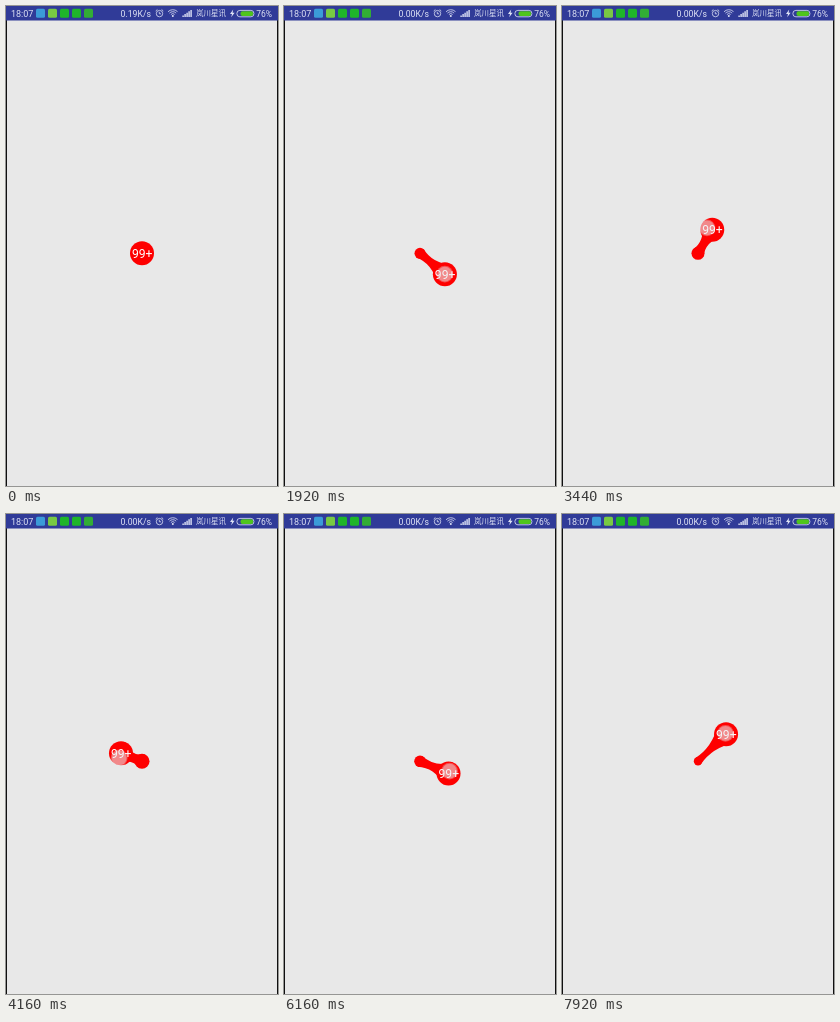
These frames come from a looping animation (272 px wide and 480 px high, 8000 ms). An HTML page with a canvas:

```html
<!DOCTYPE html>
<html lang="zh">
<head>
<meta charset="utf-8">
<title>Sticky badge</title>
<style>
  html, body { margin: 0; width: 100%; height: 100%; overflow: hidden; background: #e8e8e8; }
  canvas { display: block; width: 272px; height: 480px; }
</style>
</head>
<body>
<canvas id="stage" width="272" height="480"></canvas>
<script>
const ctx = document.getElementById('stage').getContext('2d');
const LOOP = 8000, STEP = 80, PRESS = 320, LAG = 85;
const HOME = { x: 136, y: 247.3 }, RADIUS = 12;
const RED = '#fe0000', PALE = '#dfe3f5';

// Drag path around the anchor: time, angle in degrees, distance
const PATH = [
  [320, -40, 0], [880, -40, 25], [1200, -36, 32], [1700, -40, 32.6],
  [2640, -40, 31.2], [3520, 70, 27], [4160, 159, 22.5], [4400, 193, 25],
  [5280, 270, 30], [6160, 337, 31], [7040, 375.7, 33.2], [7920, 404, 39],
  [8000, 405.5, 39.2]
];

function slope(i, k) {
  if (i === 0 || i === PATH.length - 1) return 0;
  const rate = j => (PATH[j + 1][k] - PATH[j][k]) / (PATH[j + 1][0] - PATH[j][0]);
  const a = rate(i - 1), b = rate(i);
  return a * b > 0 ? 2 * a * b / (a + b) : 0;
}

function sample(t, k) {
  const last = PATH.length - 1;
  if (t <= PATH[0][0]) return PATH[0][k];
  if (t >= PATH[last][0]) return PATH[last][k];
  let i = 0;
  while (t > PATH[i + 1][0]) i++;
  const span = PATH[i + 1][0] - PATH[i][0];
  const u = (t - PATH[i][0]) / span, v = 1 - u;
  return PATH[i][k] * (1 + 2 * u) * v * v + slope(i, k) * span * u * v * v
    + PATH[i + 1][k] * u * u * (3 - 2 * u) - slope(i + 1, k) * span * u * u * v;
}

function dragAt(t) {
  const angle = sample(t, 1) * Math.PI / 180, dist = sample(t, 2);
  return { x: HOME.x + dist * Math.cos(angle), y: HOME.y - dist * Math.sin(angle), dist, angle };
}

function disc(x, y, r, fill) {
  ctx.fillStyle = fill;
  ctx.beginPath();
  ctx.arc(x, y, r, 0, Math.PI * 2);
  ctx.fill();
}

function box(x, y, w, h, r, fill) {
  ctx.fillStyle = fill;
  ctx.beginPath();
  ctx.roundRect(x, y, w, h, r);
  ctx.fill();
}

function line(...pts) {
  ctx.beginPath();
  for (let i = 0; i < pts.length; i += 2) ctx.lineTo(pts[i], pts[i + 1]);
  ctx.stroke();
}

function label(text, x, y, font, fill, align = 'left') {
  ctx.font = font;
  ctx.fillStyle = fill;
  ctx.textAlign = align;
  ctx.fillText(text, x, y);
}

function drawAlarm() {
  ctx.beginPath();
  ctx.arc(153.5, 7.6, 3.2, 0, Math.PI * 2);
  ctx.stroke();
  line(153.3, 5.8, 153.3, 7.8, 155, 7.8);
  line(149.7, 5, 151.4, 3.5);
  line(157.3, 5, 155.6, 3.5);
}

function drawWifi() {
  for (const r of [2.6, 4.6, 6.6]) {
    ctx.beginPath();
    ctx.arc(166.8, 10.3, r, -Math.PI * 0.76, -Math.PI * 0.24);
    ctx.stroke();
  }
  disc(166.8, 10, 1, PALE);
}

function drawBattery() {
  ctx.fillStyle = PALE;
  ctx.beginPath();
  for (const [x, y] of [[227.2, 3.6], [224, 8], [226, 8], [225.2, 11.2], [228.6, 6.7], [226.6, 6.7]]) ctx.lineTo(x, y);
  ctx.fill();
  ctx.beginPath();
  ctx.roundRect(230.9, 4.4, 17, 6.4, 3);
  ctx.stroke();
  box(234.5, 5.2, 12.6, 4.8, 2, '#4fc51c');
}

function drawStatus(t) {
  ctx.fillStyle = '#303b98';
  ctx.fillRect(0, 0, 272, 14.5);
  label('18:07', 5, 10.8, '9px Roboto, sans-serif', PALE);
  ['#3b9bd8', '#78c943', '#1fb52a', '#1fb52a', '#32ad35'].forEach((c, i) =>
    box(30 + 12 * i, 2.8, 9, 9, 1.5, c));
  label(t < 1840 ? '0.19K/s' : '0.00K/s', 145, 10.8, '8.7px Roboto, sans-serif', PALE, 'right');
  ctx.strokeStyle = PALE;
  ctx.lineWidth = 0.8;
  drawAlarm();
  drawWifi();
  for (let i = 0; i < 5; i++) {
    const h = 1.6 + i * 1.35;
    box(176.4 + i * 2, 11 - h, 1.4, h, 0, PALE);
  }
  label('岚川星讯', 190, 10.2, '7.5px "Noto Sans CJK SC", "Noto Sans CJK", sans-serif', PALE);
  drawBattery();
  label('76%', 250.3, 10.6, '8.5px Roboto, sans-serif', PALE);
}

function drawNeck(p, small) {
  const nx = Math.sin(p.angle), ny = Math.cos(p.angle);
  const mx = (HOME.x + p.x) / 2, my = (HOME.y + p.y) / 2;
  ctx.fillStyle = RED;
  ctx.beginPath();
  ctx.moveTo(HOME.x + nx * small, HOME.y + ny * small);
  ctx.quadraticCurveTo(mx, my, p.x + nx * RADIUS, p.y + ny * RADIUS);
  ctx.lineTo(p.x - nx * RADIUS, p.y - ny * RADIUS);
  ctx.quadraticCurveTo(mx, my, HOME.x - nx * small, HOME.y - ny * small);
  ctx.fill();
}

function drawBadge(t) {
  const p = dragAt(t);
  if (p.dist > 0) {
    const small = RADIUS - p.dist / 5;
    disc(HOME.x, HOME.y, small, RED);
    drawNeck(p, small);
  }
  disc(p.x, p.y, RADIUS, RED);
  label('99+', p.x + 0.2, p.y + 4.5, '12.2px Roboto, sans-serif', '#fff', 'center');
  if (t >= PRESS) {
    const touch = dragAt(t + LAG);
    disc(touch.x, touch.y, 8.4, 'rgba(232,236,240,0.32)');
    disc(touch.x, touch.y, 7.4, 'rgba(232,236,240,0.38)');
  }
}

function draw(now) {
  const t = Math.floor((now % LOOP) / STEP) * STEP;
  ctx.fillStyle = '#e8e8e8';
  ctx.fillRect(0, 0, 272, 480);
  ctx.fillStyle = '#101010';
  ctx.fillRect(0, 14, 1, 466);
  ctx.fillRect(271, 14, 1, 466);
  drawStatus(t);
  drawBadge(t);
}

let start;
function tick(now) {
  start ??= now;
  draw(now - start);
  requestAnimationFrame(tick);
}
requestAnimationFrame(tick);
</script>
</body>
</html>
```
